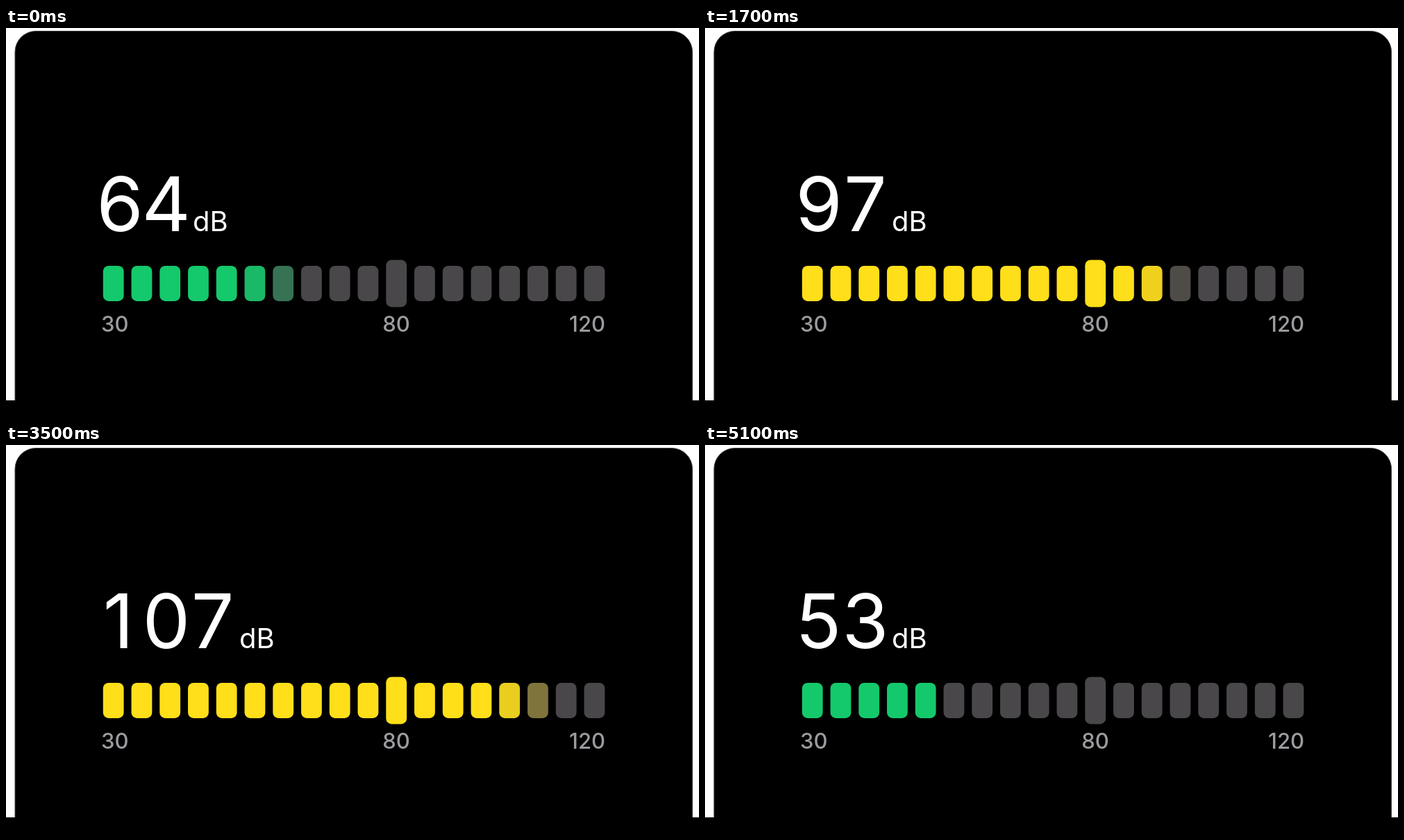
Recreate the animation shown at these times as an HTML page. Size 998 by 561 pixels, loop 5.3 s.

```html
<!DOCTYPE html>
<html lang="en">
<head>
<meta charset="utf-8">
<title>Sound level meter</title>
<style>
  html, body { margin: 0; width: 100%; height: 100%; overflow: hidden; background: #fff; }
  svg { display: block; width: 100vw; height: 100vh; font-family: Inter, Roboto, sans-serif; }
  .card { stroke: #444; }
  .digit { font-size: 109px; fill: #fff; text-anchor: middle; }
  .unit { font-size: 40px; fill: #fff; }
  .label { font-size: 31px; font-weight: 500; fill: #9c9ba0; }
</style>
</head>
<body>
<svg viewBox="0 0 998 561">
  <path class="card" d="M13 561V34.5a30 30 0 0 1 30-30H958.5a30 30 0 0 1 30 30V561Z"/>
  <rect y="537" width="998" height="24"/>
  <g id="bars"></g>
  <g id="digits"></g>
  <text id="unit" class="unit" y="293">dB</text>
  <text class="label" x="137" y="438">30</text>
  <text class="label" x="562" y="438" text-anchor="middle">80</text>
  <text class="label" x="863" y="438" text-anchor="end">120</text>
</svg>
<script>
const LOOP = 5300;
const FIRST_STEP = 100;
const STEP = 200;

// A new reading appears every 700 ms; the loop begins late in the first one.
const READINGS = [64, 61, 59, 97, 106, 107, 111, 66, 53];
const READING_TIME = 700;
const READING_OFFSET = 500;

const MIN_DB = 30;
const LIMIT_DB = 80;
const DB_PER_BAR = 5;
const BAR_COUNT = 18;
const BAR_PITCH = 40.75;
const DIGIT_PITCH = 66.8;

const GRAY = [73, 71, 74];
const GREEN = [20, 201, 107];
const YELLOW = [255, 223, 25];

const byId = id => document.getElementById(id);
const clamp = x => Math.min(1, Math.max(0, x));
const mix = (a, b, k) => a + (b - a) * k;
const barsFor = db => Math.round((db - MIN_DB) / DB_PER_BAR);

function add(parent, tag, attributes) {
  const node = document.createElementNS("http://www.w3.org/2000/svg", tag);
  for (const name in attributes) node.setAttribute(name, attributes[name]);
  return parent.appendChild(node);
}

const bars = Array.from({ length: BAR_COUNT }, (_, i) => {
  const height = i === barsFor(LIMIT_DB) ? 68 : 51;
  return add(byId("bars"), "rect", {
    x: 139.8 + BAR_PITCH * i, y: 368.4 - height / 2, width: 29.8, height, rx: 8
  });
});

const digits = [0, 1, 2].map(i => add(byId("digits"), "text", {
  class: "digit", x: 164 + DIGIT_PITCH * i, y: 293
}));

function drawValue(value) {
  const text = String(value);
  digits.forEach((node, i) => {
    node.textContent = text[i] || "";
    // The narrow 1 sits a little left in its cell.
    node.setAttribute("dx", text[i] === "1" ? -2 : 0);
  });
  byId("unit").setAttribute("x", 135.5 + DIGIT_PITCH * text.length);
}

// The bars accelerate toward the next reading before its number appears.
function drawBars(value, next, progress) {
  const from = barsFor(value);
  const to = barsFor(next);
  const trail = Math.max(0, from - to) * progress / 6;
  const edge = mix(from, to, progress ** 2) + trail;
  const fade = 1 + progress + trail;
  const lit = value > LIMIT_DB ? YELLOW : GREEN;
  bars.forEach((bar, i) => {
    const amount = clamp((edge - i) / fade);
    const color = GRAY.map((channel, c) => Math.round(mix(channel, lit[c], amount)));
    bar.setAttribute("fill", `rgb(${color})`);
  });
}

function render(time) {
  const position = (time + READING_OFFSET) / READING_TIME;
  const index = Math.floor(position);
  const value = READINGS[index];
  const next = READINGS[(index + 1) % READINGS.length];
  drawValue(value);
  drawBars(value, next, position - index);
}

// The picture advances in even steps after a short first one.
function stepTime(time) {
  if (time < FIRST_STEP) return 0;
  return FIRST_STEP + STEP * Math.floor((time - FIRST_STEP) / STEP);
}

const start = performance.now();
function tick() {
  render(stepTime((performance.now() - start) % LOOP));
  requestAnimationFrame(tick);
}
tick();
</script>
</body>
</html>
```
